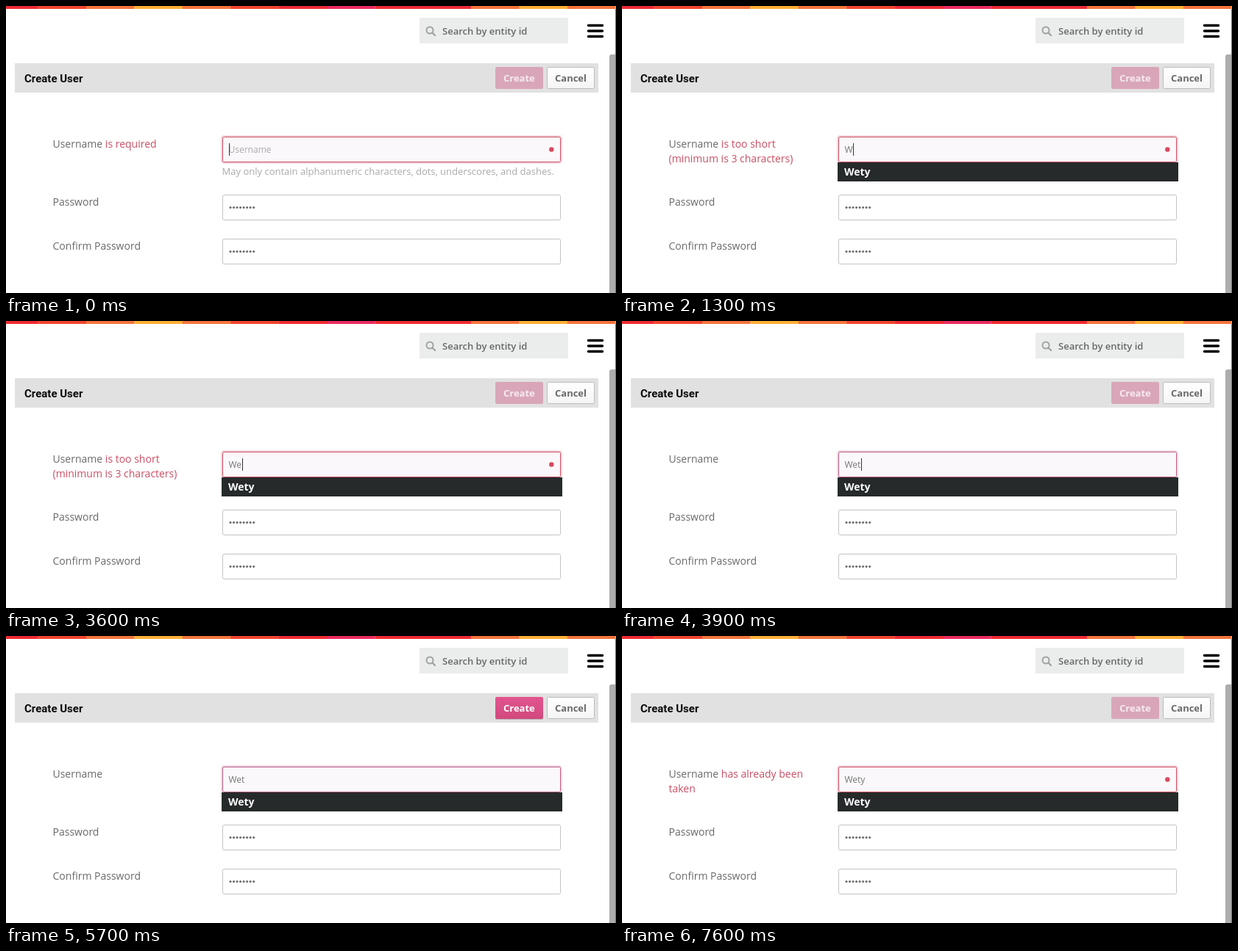
Write an HTML page that moves like this. It is 829 px wide and 391 px high and loops after 8 s.

```html
<!DOCTYPE html>
<html lang="en">
<head>
<meta charset="utf-8">
<title>Create User</title>
<style>
  html, body { margin: 0; width: 100%; height: 100%; overflow: hidden; background: #fff; }
  svg { display: block; width: 100%; height: 100%; }
  text { font: 14px "Open Sans", sans-serif; fill: #696969; white-space: pre; }
  .title { font: 700 15px Roboto, sans-serif; fill: #0c0c0c; }
  .search { font-weight: 600; font-size: 13px; fill: #686868; }
  .button { font-weight: 700; font-size: 13px; }
  .hint { font-size: 13px; fill: #a9a9a9; }
  .input { font-size: 12px; fill: #777; }
  .input.empty { fill: #aaa; }
  .option { font-weight: 700; fill: #fff; }
  .error { fill: #cb4f64; }
  .box { fill: #fff; stroke: #c3c3c3; }
</style>
</head>
<body>
<svg viewBox="0 0 829 391">
  <defs>
    <linearGradient id="pink" x2="0" y2="1">
      <stop stop-color="#e2558f"/><stop offset="1" stop-color="#d1487e"/>
    </linearGradient>
    <linearGradient id="pale" x2="0" y2="1">
      <stop stop-color="#fff"/><stop offset="1" stop-color="#f5f5f5"/>
    </linearGradient>
  </defs>
  <rect width="829" height="391" fill="#fff"/>
  <g id="stripes"></g>

  <rect x="562" y="16" width="202" height="35" fill="#ebeded"/>
  <g fill="none" stroke="#a2a2a2" stroke-width="2">
    <circle cx="576" cy="33" r="4.5"/>
    <path d="M579.5 36.5l3.5 3.5" stroke-width="2.4" stroke-linecap="round"/>
  </g>
  <text class="search" x="593" y="39">Search by entity id</text>
  <path d="M791.5 26.5h19M791.5 34h19M791.5 41.5h19" stroke="#000" stroke-width="3.4" stroke-linecap="round"/>

  <path d="M820 391V69a3 3 0 0 1 3-3h5v325z" fill="#adadad"/>
  <rect x="828" y="4" width="1" height="387" fill="#777"/>

  <rect x="12" y="78" width="793" height="40" fill="#e1e1e1"/>
  <text class="title" x="25" y="104">Create User</text>
  <rect id="shade" x="665" y="84" width="65" height="30" rx="2" fill="#bdb3b8"/>
  <rect id="create" x="665" y="83" width="65" height="30" rx="2"/>
  <text id="createText" class="button" x="676" y="103">Create</text>
  <rect x="735.5" y="83.5" width="64" height="29" rx="2" fill="url(#pale)" stroke="#bcbcbc"/>
  <text class="button" x="746" y="103">Cancel</text>

  <text x="63.5" y="193">Username<tspan id="error1" class="error"></tspan></text>
  <text id="error2" class="error" x="63.5" y="213"></text>
  <text x="63.5" y="272">Password</text>
  <text x="63.5" y="332">Confirm Password</text>

  <rect id="glow" x="293.5" y="177.5" width="461" height="36" rx="3" fill="none" stroke-width="3" opacity=".22"/>
  <rect id="field" x="294.5" y="178.5" width="459" height="34" rx="2" fill="#faf8fa"/>
  <text id="value" class="input" x="302.5" y="200"></text>
  <rect id="caret" y="187" width="1" height="17" fill="#333"/>
  <circle id="dot" cx="741.3" cy="195.5" r="3.2" fill="#d9495f"/>
  <text id="hint" class="hint" x="293.5" y="230">May only contain alphanumeric characters, dots, underscores, and dashes.</text>
  <g id="menu">
    <rect x="293" y="213" width="463" height="26" fill="#262a2b"/>
    <text class="option" x="302" y="231">Wety</text>
  </g>

  <rect class="box" x="294.5" y="257.5" width="459" height="34" rx="2"/>
  <rect class="box" x="294.5" y="317.5" width="459" height="34" rx="2"/>
  <g id="bullets" fill="#6c6c6c"></g>
</svg>
<script>
const LOOP = 8000;
const NAME = "Wety";
const KEYS = [1300, 2400, 3900, 5800];
const CARET_X = [303, 314, 321, 325, 332];
const BLINKS = [300, 900, 1800, 2400, 3000, 3600, 4500, 5100, 5700, 5800, 6400, 7000, 7600];

// Validation messages, each as two lines
const ERRORS = [
  [0, " is required", ""],
  [1300, " is too short", "(minimum is 3 characters)"],
  [3900, "", ""],
  [6700, " has already been", "taken"]
];

const el = id => document.getElementById(id);
const show = (id, on) => el(id).setAttribute("visibility", on ? "visible" : "hidden");
const passed = (times, t) => times.filter(at => at <= t).length;

function add(parent, tag, attrs) {
  const node = document.createElementNS("http://www.w3.org/2000/svg", tag);
  for (const key in attrs) node.setAttribute(key, attrs[key]);
  el(parent).append(node);
}

const [RED, CORAL, ORANGE, YELLOW, PINK] = ["#ef2b33", "#f1442f", "#f4743b", "#fbb034", "#ec2a62"];
[RED, CORAL, ORANGE, YELLOW, ORANGE, CORAL, RED, PINK, RED, RED, ORANGE, YELLOW, ORANGE]
  .forEach((fill, i) => add("stripes", "rect", { x: i * 65.4 - 21.8, width: 65.6, height: 4, fill }));

for (const cy of [274.5, 334.5])
  for (let i = 0; i < 8; i++) add("bullets", "circle", { cx: 305 + i * 4.52, cy, r: 1.55 });

function draw(t) {
  const typed = passed(KEYS, t);
  const [, line1, line2] = ERRORS.filter(e => e[0] <= t).pop();
  const invalid = line1 !== "";
  const active = t >= 4700 && t < 5800;
  const border = invalid ? "#cd4d62" : "#bd5a86";

  el("error1").textContent = line1;
  el("error2").textContent = line2;
  el("field").setAttribute("stroke", border);
  el("glow").setAttribute("stroke", border);
  show("dot", invalid);

  el("value").textContent = typed ? NAME.slice(0, typed) : "Username";
  el("value").classList.toggle("empty", !typed);
  el("caret").setAttribute("x", CARET_X[typed]);
  show("caret", passed(BLINKS, t) % 2 === 0);
  show("hint", !typed);
  show("menu", typed);

  el("create").setAttribute("fill", active ? "url(#pink)" : "#d9a6b9");
  el("createText").style.fill = active ? "#fff" : "#f6eaef";
  show("shade", active);
}

function tick(now) {
  draw(now % LOOP);
  requestAnimationFrame(tick);
}
draw(0);
requestAnimationFrame(tick);
</script>
</body>
</html>
```
